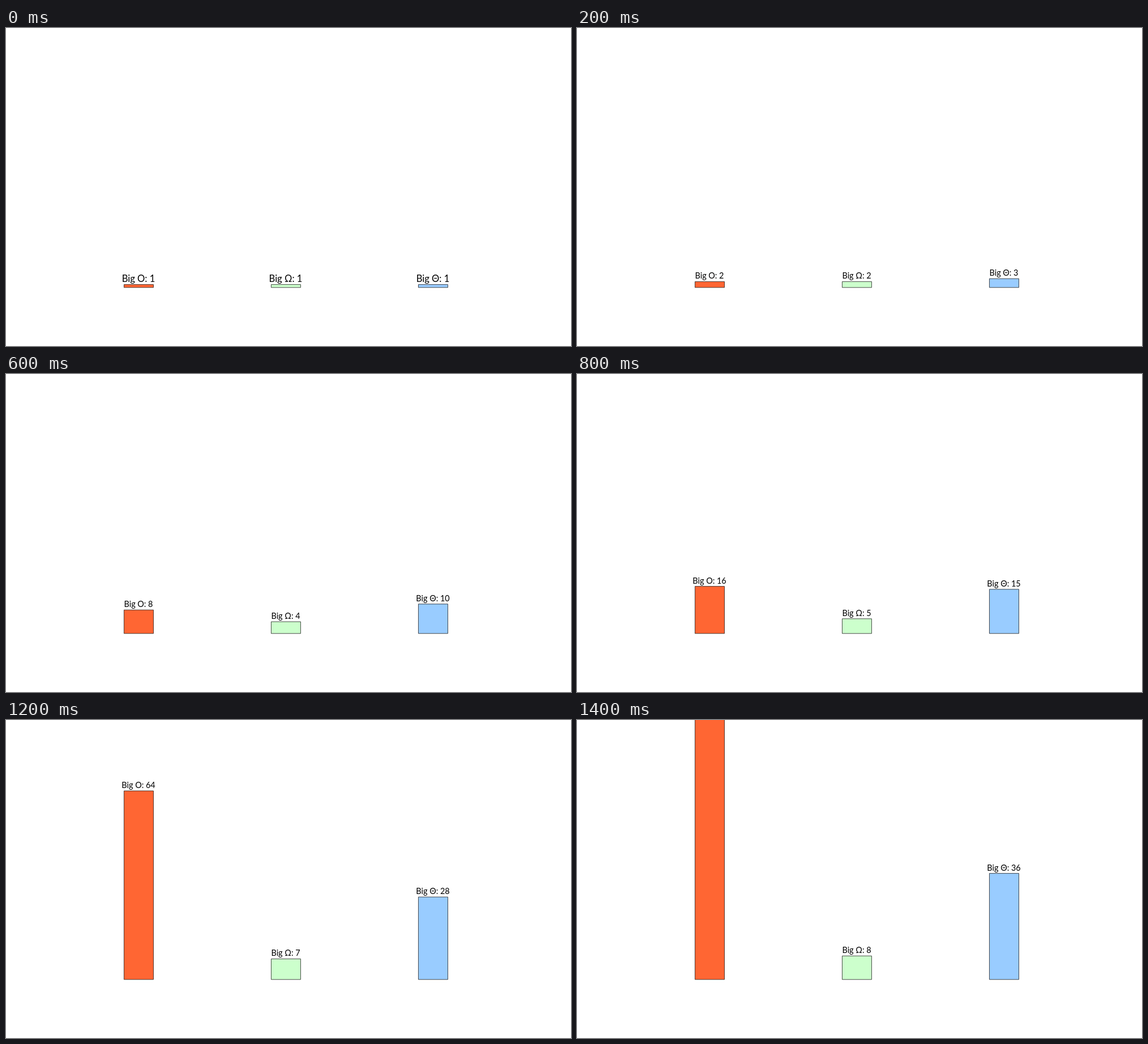
An HTML page with a canvas that plays this animation: 998x561 px, repeating every 1600 ms.

```html
<!DOCTYPE html>
<html lang="en">
<head>
<meta charset="utf-8">
<title>Growth rates</title>
<style>
html, body { margin: 0; width: 100%; height: 100%; overflow: hidden; background: #fff; }
canvas { display: block; }
</style>
</head>
<body>
<canvas id="stage" width="998" height="561"></canvas>
<script>
const ctx = document.getElementById('stage').getContext('2d');
const UNIT = 5.2;
const BASE = 88;
const STEP = 200;
const STEPS = 8;

const bars = [
  { sign: 'O', col: 40, fill: '#ff6633', value: n => 2 ** (n - 1) },
  { sign: 'Ω', col: 90, fill: '#ccffcc', value: n => n },
  { sign: 'Θ', col: 140, fill: '#99ccff', value: n => n * (n + 1) / 2 }
];

function drawBar(bar, n) {
  const value = bar.value(n);
  const x = bar.col * UNIT + 0.45;
  const y = (BASE - value) * UNIT + 0.2;
  ctx.beginPath();
  ctx.rect(x, y, 10 * UNIT, value * UNIT);
  ctx.fillStyle = bar.fill;
  ctx.fill();
  ctx.stroke();
  ctx.fillStyle = '#000';
  ctx.fillText(`Big ${bar.sign}: ${value}`, (bar.col + 5) * UNIT, y - 5.1);
}

function draw(n) {
  ctx.fillStyle = '#fff';
  ctx.fillRect(0, 0, 998, 561);
  ctx.lineWidth = 0.7;
  ctx.strokeStyle = '#000';
  ctx.textAlign = 'center';
  // The opening labels are set slightly larger.
  ctx.font = `${n === 1 ? 16.6 : 14.4}px Lato, sans-serif`;
  for (const bar of bars) drawBar(bar, n);
}

function tick() {
  draw(Math.floor(performance.now() / STEP) % STEPS + 1);
  requestAnimationFrame(tick);
}
tick();
</script>
</body>
</html>
```
